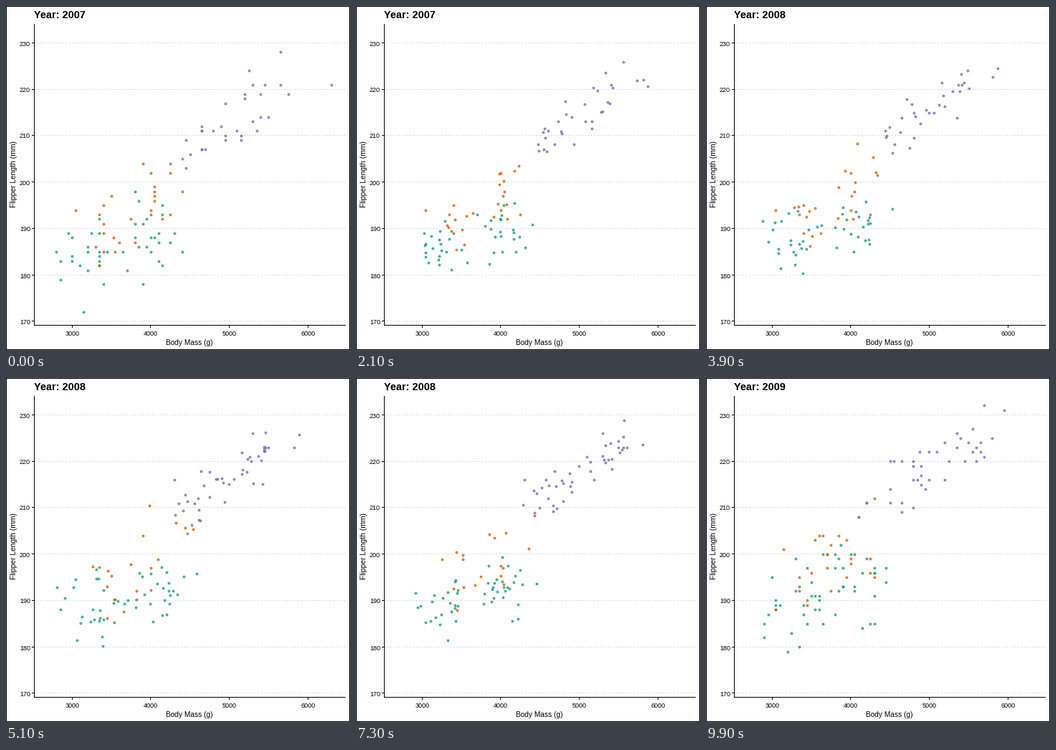
Write a matplotlib script that moves like this. It is 480 by 480 pixels and loops after 10000 ms.

```python
import numpy as np
import matplotlib.pyplot as plt
from matplotlib.animation import FuncAnimation

SIZE, FRAMES, MID = 480, 100, 49
LEFT, RIGHT, TOP, BASE = 39.5, 474, 25, 445.5

plt.rcParams["font.family"] = "Liberation Sans"
rng = np.random.default_rng(7)


def px(mass):
    return 92 + (mass - 3000) * 0.1097


def py(flip):
    return 51.4 + (230 - flip) * 6.475


class Species:
    """Three yearly clouds; small and large birds alternate by row."""

    def __init__(self, color, counts, mass, flips, spread, r, leader):
        self.color = color
        self.poses = []
        for n, flip, first in zip(counts, flips, leader):
            a, b = np.clip(rng.normal(size=(2, n)), -2, 2)
            size = 0.8 * (-1) ** np.arange(1, n + 1) + 0.6 * a
            length = r * size + np.sqrt(1 - r * r) * b
            m = np.round((mass + spread[0] * size) / 50) * 50
            f = np.round(flip + spread[1] * length)
            m[0], f[0] = first
            self.poses.append(np.column_stack([px(m), py(f)]))

    def at(self, i):
        """Paired points glide; leftovers wait, newcomers appear on the year."""
        if i == FRAMES - 1:
            return self.poses[2]
        k, t = (0, i / MID) if i < MID else (1, (i - MID) / (FRAMES - 1 - MID))
        a, b = self.poses[k], self.poses[k + 1]
        m = min(len(a), len(b))
        pos = a.copy()
        pos[:m] += (b[:m] - a[:m]) * t
        return pos


groups = [
    Species("#1B9E77", (44, 50, 52), 3700, (187, 191, 192), (450, 5.8), 0.45,
            [(3150, 172), (4150, 197), (3875, 202)]),
    Species("#D95F02", (26, 18, 24), 3730, (192, 198, 198), (380, 6.5), 0.65,
            [(3525, 188), (4550, 205), (4300, 212)]),
    Species("#7570B3", (33, 45, 41), 5080, (215, 217.5, 218.5), (490, 6.2), 0.8,
            [(6300, 221), (5300, 220), (4875, 222)]),
]

fig = plt.figure(figsize=(SIZE / 72, SIZE / 72), dpi=72, facecolor="white")
ax = fig.add_axes([0, 0, 1, 1])
ax.set(xlim=(0, SIZE), ylim=(SIZE, 0))
ax.axis("off")


def line(xs, ys, color="black", **kw):
    ax.plot(xs, ys, color=color, lw=1, snap=False, solid_capstyle="butt",
            solid_joinstyle="miter", dash_capstyle="butt", **kw)


end = SIZE - 0.5
line([0.5, end, end, 0.5, 0.5], [0.5, 0.5, end, end, 0.5])

for flip in range(170, 231, 10):
    y = np.floor(py(flip)) + 0.5
    line([LEFT + 0.5, RIGHT], [y, y], "#BEBEBE", ls=(0, (1, 3)), zorder=1)
    line([LEFT - 3.5, LEFT], [y, y])
    ax.text(34, y + 0.5, str(flip), size=9, ha="right", va="center_baseline")
for mass in range(3000, 6001, 1000):
    x = np.floor(px(mass)) + 0.5
    line([x, x], [BASE, BASE + 3.5])
    ax.text(x, 460, str(mass), size=9, ha="center", va="baseline")
line([LEFT, LEFT], [TOP, BASE + 0.5])
line([LEFT, RIGHT], [BASE, BASE])

ax.text(255.5, 473, "Body Mass (g)", size=10.1, ha="center", va="baseline")
ax.text(16, 234.5, "Flipper Length (mm)", size=10.2, rotation=90,
        ha="right", va="center")
title = ax.text(39, 17, "", size=14.5, weight="bold", va="baseline")

dots = [ax.scatter([], [], s=3 ** 2, color=g.color, alpha=0.72,
                   linewidths=1, zorder=3) for g in groups]


def update(i):
    title.set_text(f"Year: {round(2007 + 2 * i / (FRAMES - 1))}")
    for g, d in zip(groups, dots):
        d.set_offsets(g.at(i))
    return [title, *dots]


anim = FuncAnimation(fig, update, frames=FRAMES, interval=100,
                     repeat=True, repeat_delay=0)
plt.show()
```
